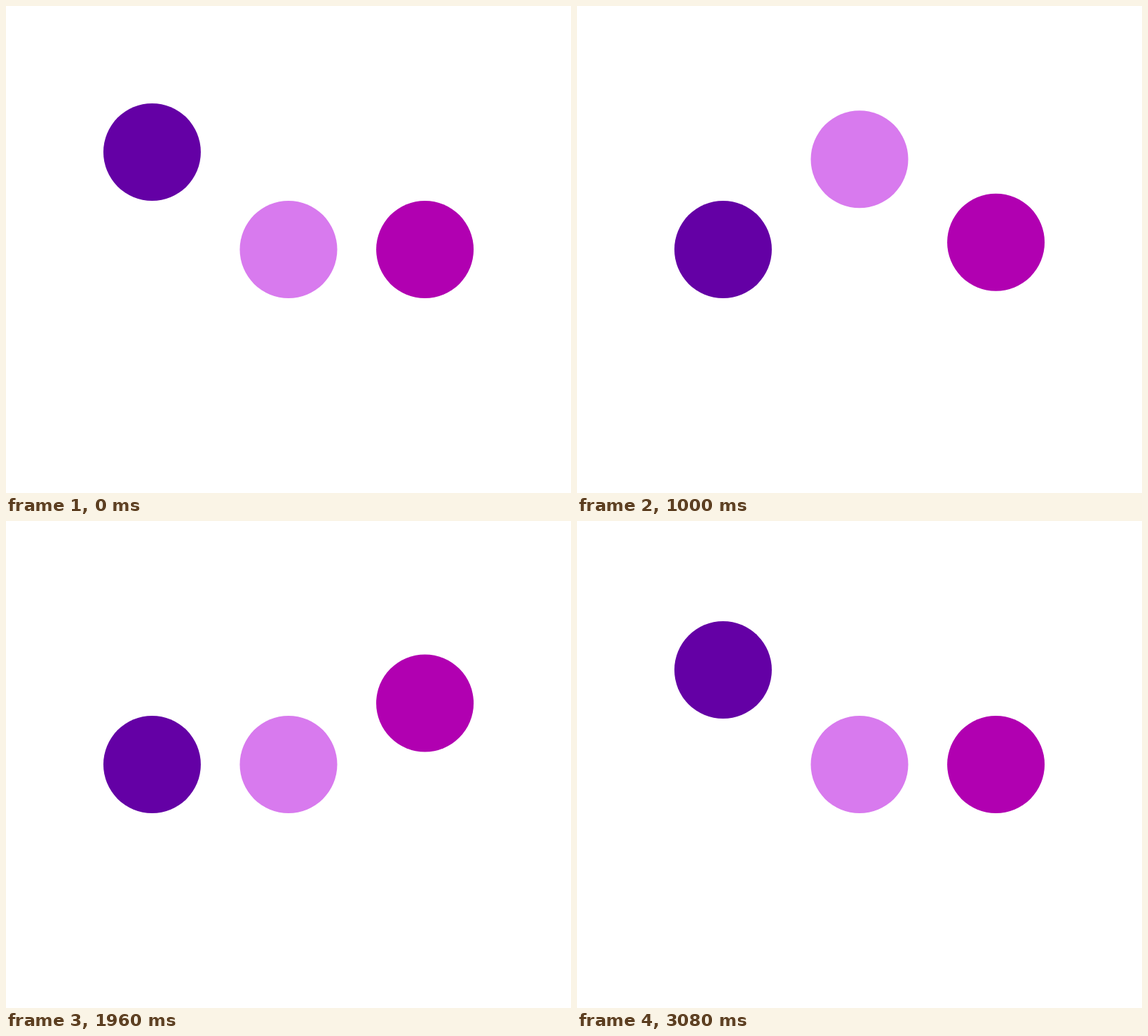
Animation of 806x695 px, one loop 3.12 s. Source, as an HTML page:

```html
<!DOCTYPE html>
<html lang="en">
<head>
<meta charset="utf-8">
<title>Bouncing dots</title>
<style>
  html, body { margin: 0; width: 100%; height: 100%; overflow: hidden; background: #fff; }
  svg { display: block; width: 806px; height: 695px; }
</style>
</head>
<body>
<svg viewBox="0 0 806 695">
  <circle cx="208.4" cy="347.5" r="69.5" fill="#6400a5"/>
  <circle cx="403" cy="347.5" r="69.5" fill="#d87aee"/>
  <circle cx="597.6" cy="347.5" r="69.5" fill="#b100b1"/>
</svg>
<script>
const LOOP = 3120, TICK = 40;
const START = 71, SPACING = 792, MOVE = 720;
const LIFT = 139;
const dots = document.querySelectorAll('circle');

// The curve of CSS ease-in-out, solved by bisection.
function ease(x) {
  if (x <= 0) return 0;
  if (x >= 1) return 1;
  let lo = 0, hi = 1;
  for (let i = 0; i < 24; i++) {
    const s = (lo + hi) / 2, u = 1 - s;
    const curveX = 1.26 * s * u * u + 1.74 * s * s * u + s ** 3;
    if (curveX < x) lo = s; else hi = s;
  }
  return lo * lo * (3 - 2 * lo);
}

function draw(time) {
  const t = Math.floor((time % LOOP) / TICK) * TICK;
  const [a, b, c, d] = [0, 1, 2, 3].map(k => ease((t - START - k * SPACING) / MOVE));
  // Each move lowers one dot while the next one rises.
  [1 - a + d, a - b, b - c].forEach((height, i) => {
    dots[i].setAttribute('cy', 347.5 - LIFT * height);
  });
}

const begin = performance.now();
function frame() {
  draw(performance.now() - begin);
  requestAnimationFrame(frame);
}
frame();
</script>
</body>
</html>
```
